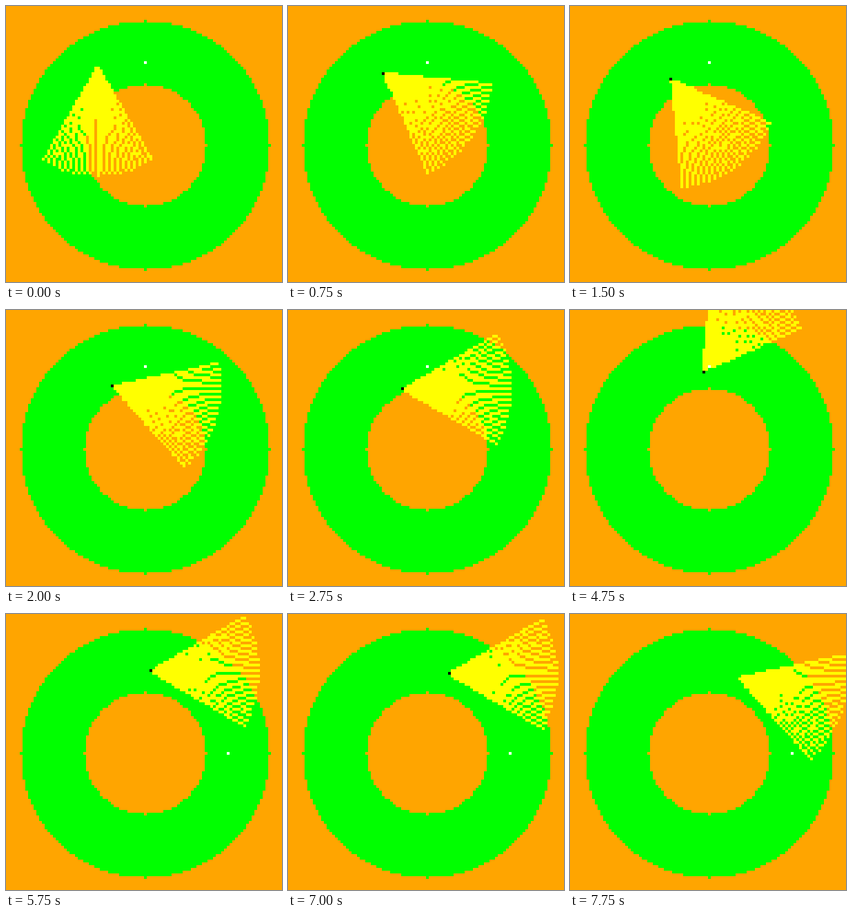
An HTML page with a canvas that plays this animation: 500x500 px, repeating every 8 s.

```html
<!DOCTYPE html>
<html>
<head>
<meta charset="utf-8">
<style>
  html, body { margin: 0; width: 100%; height: 100%; overflow: hidden; background: #ffa500; }
  canvas { display: block; width: 500px; height: 500px; }
</style>
</head>
<body>
<canvas id="stage" width="500" height="500"></canvas>
<script>
const ctx = document.getElementById('stage').getContext('2d');
const CELL = 5, GRID = 100, STEP = 250;
const TURN = 18, SPREAD = 30, RAY_GAP = 3, REACH = 40;

// Heading of the car per step, in units of TURN degrees.
const headings = [
  5, 4, 3, 2, 3, 2, 3, 2, 1, 2, 1, 0, -1, -2, -3, -2,
  -3, -3, -3, -3, -2, -1, -1, 0, 1, 1, 1, 0, 0, 1, 2, 1
];
// [last step, cells per step]
const speeds = [[6, 1.04], [11, 1.06], [23, 1.17], [28, 1.205], [31, 1.09]];
const goals = [{ from: 0, x: 50, y: 20 }, { from: 21, x: 80, y: 50 }];

const rad = deg => deg * Math.PI / 180;

const poses = [{ x: 33, y: 22, deg: headings[0] * TURN }];
for (let n = 1; n < headings.length; n++) {
  const deg = headings[n] * TURN, prev = poses[n - 1];
  const speed = speeds.find(s => n <= s[0])[1];
  poses.push({
    x: prev.x + speed * Math.cos(rad(deg)),
    y: prev.y + speed * Math.sin(rad(deg)),
    deg
  });
}

function dot(x, y, color) {
  ctx.fillStyle = color;
  ctx.fillRect(Math.floor(x) * CELL, Math.floor(y) * CELL, CELL, CELL);
}

function drawTrack() {
  ctx.fillStyle = '#ffa500';
  ctx.fillRect(0, 0, 500, 500);
  for (let y = 0; y < GRID; y++) {
    for (let x = 0; x < GRID; x++) {
      const d = Math.hypot(x - 50, y - 50);
      if (d > 22 && d <= 45) dot(x, y, '#00ff00');
    }
  }
}

function draw(n) {
  const car = poses[n];
  drawTrack();
  dot(car.x, car.y, '#000');
  for (let a = -SPREAD; a <= SPREAD; a += RAY_GAP) {
    const dx = Math.cos(rad(car.deg + a)), dy = Math.sin(rad(car.deg + a));
    for (let i = 1; i < REACH; i++) dot(car.x + dx * i, car.y + dy * i, '#ffff00');
  }
  const goal = goals.filter(g => n >= g.from).pop();
  dot(goal.x, goal.y, '#fff');
}

const start = performance.now();
let shown = -1;
function tick() {
  const n = Math.floor((performance.now() - start) / STEP) % poses.length;
  if (n !== shown) draw(shown = n);
  requestAnimationFrame(tick);
}
tick();
</script>
</body>
</html>
```
